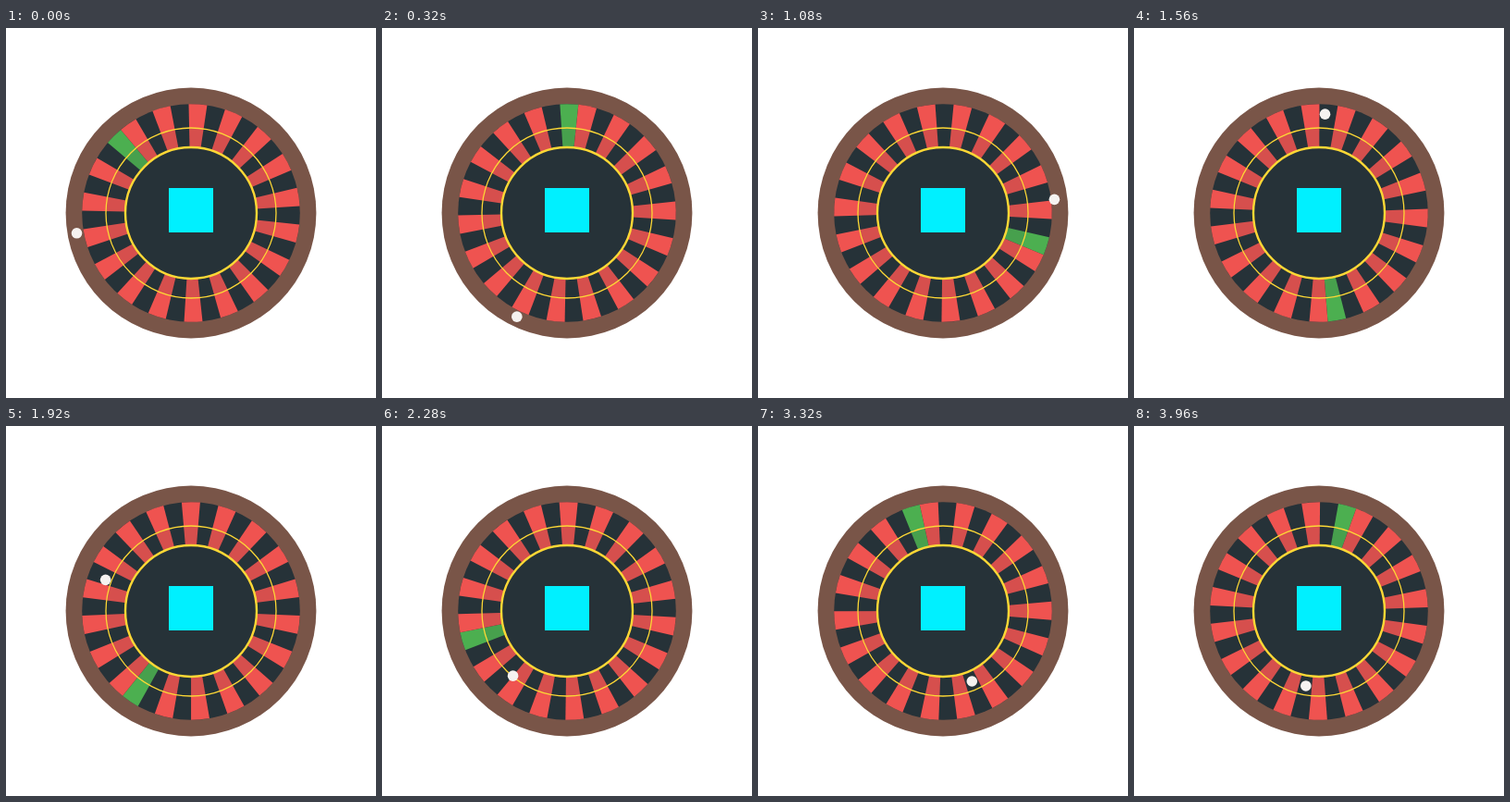
These frames come from a looping animation (400x400 px, 5.16 s). An HTML page with a canvas:

```html
<!DOCTYPE html>
<html lang="en">
<head>
<meta charset="utf-8">
<title>Roulette wheel</title>
<style>
  html, body { margin: 0; width: 100%; height: 100%; overflow: hidden; background: #fff; }
  canvas { display: block; width: 400px; height: 400px; }
</style>
</head>
<body>
<canvas id="stage" width="400" height="400"></canvas>
<script>
const ctx = document.getElementById('stage').getContext('2d');
const LOOP = 5160, STOP = 3960, STEP = 40, POCKETS = 37;
const RED = '#ef5350', DARK = '#263238', GREEN = '#4caf50', GOLD = '#fdd835';
const rad = deg => deg * Math.PI / 180;
const progress = (t, from, to) => Math.min(1, Math.max(0, (t - from) / (to - from)));

// Angles are in degrees, clockwise from the top.
const wheelAngle = t => -45 + 433.7 * Math.sin(t / 3000);

// The ball rolls along the rim, then spirals down into the pockets.
const ballRadius = t => 125.4 - 2.8 * progress(t, 0, 1040)
  - 40.4 * (1 - (1 - progress(t, 1040, 3240)) ** 1.8);

// Ball angle relative to the wheel: backwards, until it settles in a pocket.
const ballOffset = smooth([[0, 305], [640, 105.5], [1560, -167],
  [2280, -394], [2840, -523.5], [3240, -545.2], [STOP, -545.2]]);

// Monotone cubic curve through [ms, value] keys.
function smooth(keys) {
  const slope = i => (keys[i + 1][1] - keys[i][1]) / (keys[i + 1][0] - keys[i][0]);
  const last = keys.length - 1;
  const tangent = keys.map((_, i) => {
    const a = slope(Math.max(i - 1, 0)), b = slope(Math.min(i, last - 1));
    return a * b > 0 ? 2 * a * b / (a + b) : 0;
  });
  return t => {
    const next = keys.findIndex(([time]) => time >= t) || 1, i = next - 1;
    const [x0, y0] = keys[i], [x1, y1] = keys[next];
    const h = x1 - x0, s = (t - x0) / h, r = 1 - s;
    return y0 * r * r * (1 + 2 * s) + y1 * s * s * (3 - 2 * s)
      + h * s * r * (tangent[i] * r - tangent[next] * s);
  };
}

function disc(x, y, radius, fill) {
  ctx.beginPath();
  ctx.arc(x, y, radius, 0, 2 * Math.PI);
  ctx.fillStyle = fill;
  ctx.fill();
}

function ring(radius, width) {
  ctx.beginPath();
  ctx.arc(0, 0, radius, 0, 2 * Math.PI);
  ctx.strokeStyle = GOLD;
  ctx.lineWidth = width;
  ctx.stroke();
}

function drawPockets(angle) {
  const size = 360 / POCKETS;
  disc(0, 0, 117.8, DARK);
  for (let i = 0; i < POCKETS; i++) {
    if (i && i % 2 === 0) continue;
    const start = angle - 90 + (i - 0.5) * size;
    ctx.beginPath();
    ctx.moveTo(0, 0);
    ctx.arc(0, 0, 117.8, rad(start), rad(start + size));
    ctx.fillStyle = i ? RED : GREEN;
    ctx.fill();
  }
}

function draw(t) {
  const angle = wheelAngle(t);
  const ball = rad(angle + ballOffset(t)), radius = ballRadius(t);
  ctx.setTransform(1, 0, 0, 1, 0, 0);
  ctx.fillStyle = '#fff';
  ctx.fillRect(0, 0, 400, 400);
  ctx.translate(200, 200);
  disc(0, 0, 135.4, '#795548');
  drawPockets(angle);
  disc(0, 0, 92, 'rgba(38, 50, 56, 0.12)');
  ring(92, 1.3);
  disc(0, 0, 71, DARK);
  ring(71, 2.4);
  ctx.fillStyle = '#00f0ff';
  ctx.fillRect(-24, -27, 48, 48);
  disc(radius * Math.sin(ball), -radius * Math.cos(ball), 5.8, '#f5f2f0');
}

const begin = performance.now();
function tick() {
  const t = Math.max(0, performance.now() - begin) % LOOP;
  draw(Math.min(STOP, Math.floor(t / STEP) * STEP));
  requestAnimationFrame(tick);
}
tick();
</script>
</body>
</html>
```
